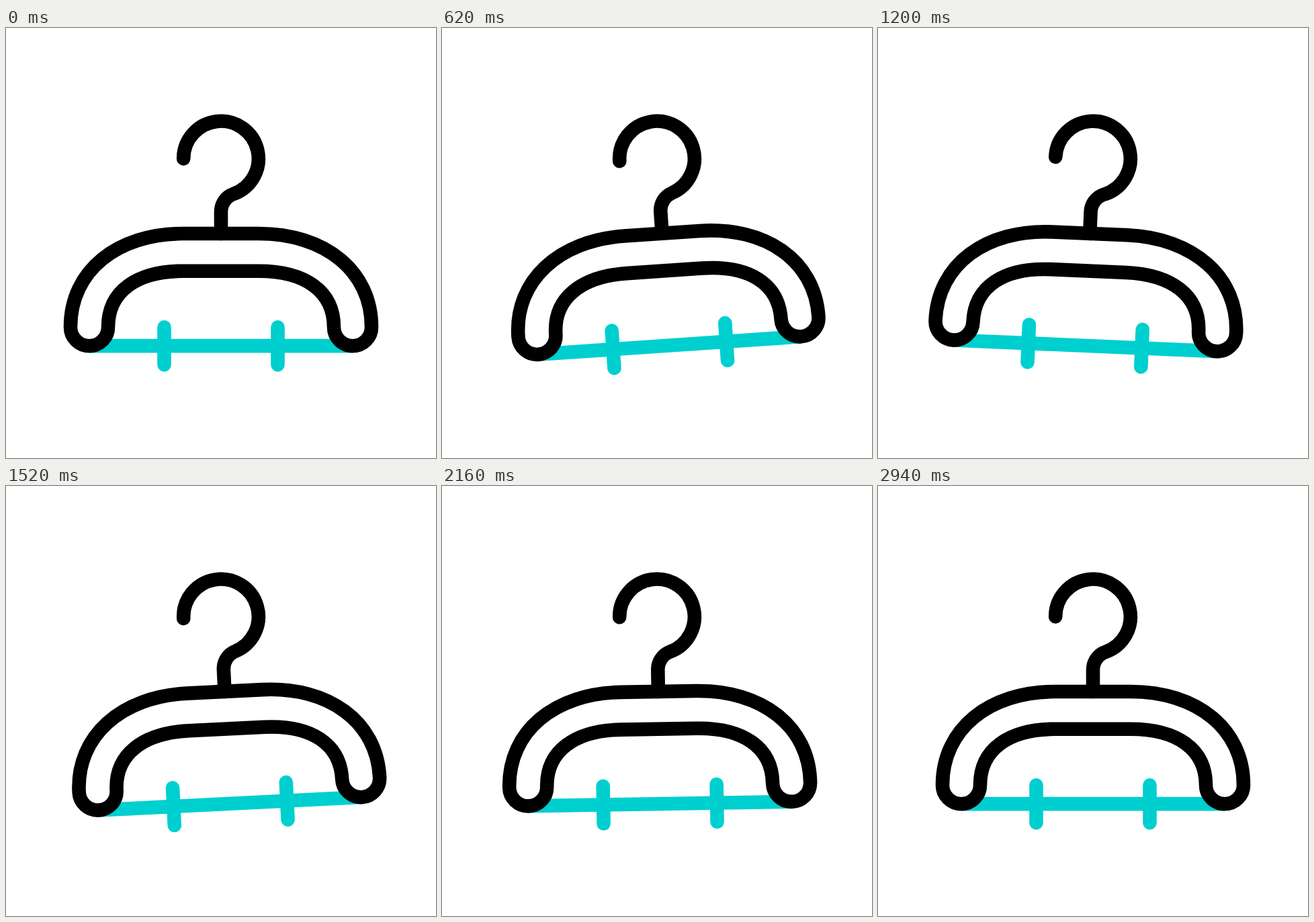
Animation of 640 by 640 pixels, one loop 3.6 s. Source, as an HTML page:

```html
<!DOCTYPE html>
<html lang="en">
<head>
<meta charset="utf-8">
<title>Swinging hanger</title>
<style>
  html, body { margin: 0; width: 100%; height: 100%; overflow: hidden; background: #fff; }
  svg { display: block; width: 100%; height: 100%; }
</style>
</head>
<body>
<svg viewBox="0 0 640 640">
  <g id="hanger" fill="none" stroke-width="20.6">
    <g stroke="#00cfcf">
      <path d="M124 473.1H516"/>
      <path stroke-linecap="round" d="M235.5 445.4V501.2M404.5 445.4V501.2"/>
    </g>
    <g stroke="#000">
      <path stroke-linecap="round" d="M320 306V273.5C320 261.6 327.5 250.9 338.6 247A55.8 55.8 0 1 0 264.2 194.4"/>
      <path stroke-linejoin="round" d="M96 445.2C96 361 166 306 264 306H376C474 306 544 361 544 445.2A28 28 0 0 1 488 445.2C488 391.5 445 361.7 376 361.7H264C195 361.7 152 391.5 152 445.2A28 28 0 0 1 96 445.2Z"/>
    </g>
  </g>
</svg>
<script>
  const LOOP = 3600;
  const PIVOT = { x: 320, y: 194.4 };

  // Keyframes as [time in ms, value]
  const swing = [[0, 0], [300, 3], [660, -4], [1060, 4], [1467, -3],
                 [1833, 2], [2200, -1], [2567, 1], [2933, 0]];
  const drop = [[0, 0], [300, 20.8], [633, 0]];

  // cubic-bezier(.5, 0, .5, 1), solved by bisection
  function ease(x) {
    let low = 0, high = 1;
    for (let i = 0; i < 24; i++) {
      const mid = (low + high) / 2;
      if (1.5 * mid * (1 - mid) + mid ** 3 < x) low = mid;
      else high = mid;
    }
    return low * low * (3 - 2 * low);
  }

  function valueAt(keys, time) {
    const next = keys.findIndex(key => key[0] > time);
    if (next < 0) return keys[keys.length - 1][1];
    const [t0, v0] = keys[next - 1];
    const [t1, v1] = keys[next];
    return v0 + (v1 - v0) * ease((time - t0) / (t1 - t0));
  }

  const hanger = document.getElementById('hanger');

  function draw(time) {
    const angle = valueAt(swing, time);
    const dy = valueAt(drop, time);
    hanger.setAttribute('transform',
      `translate(0 ${dy}) rotate(${angle} ${PIVOT.x} ${PIVOT.y})`);
  }

  const start = performance.now();
  function tick() {
    draw((performance.now() - start) % LOOP);
    requestAnimationFrame(tick);
  }
  draw(0);
  requestAnimationFrame(tick);
</script>
</body>
</html>
```
